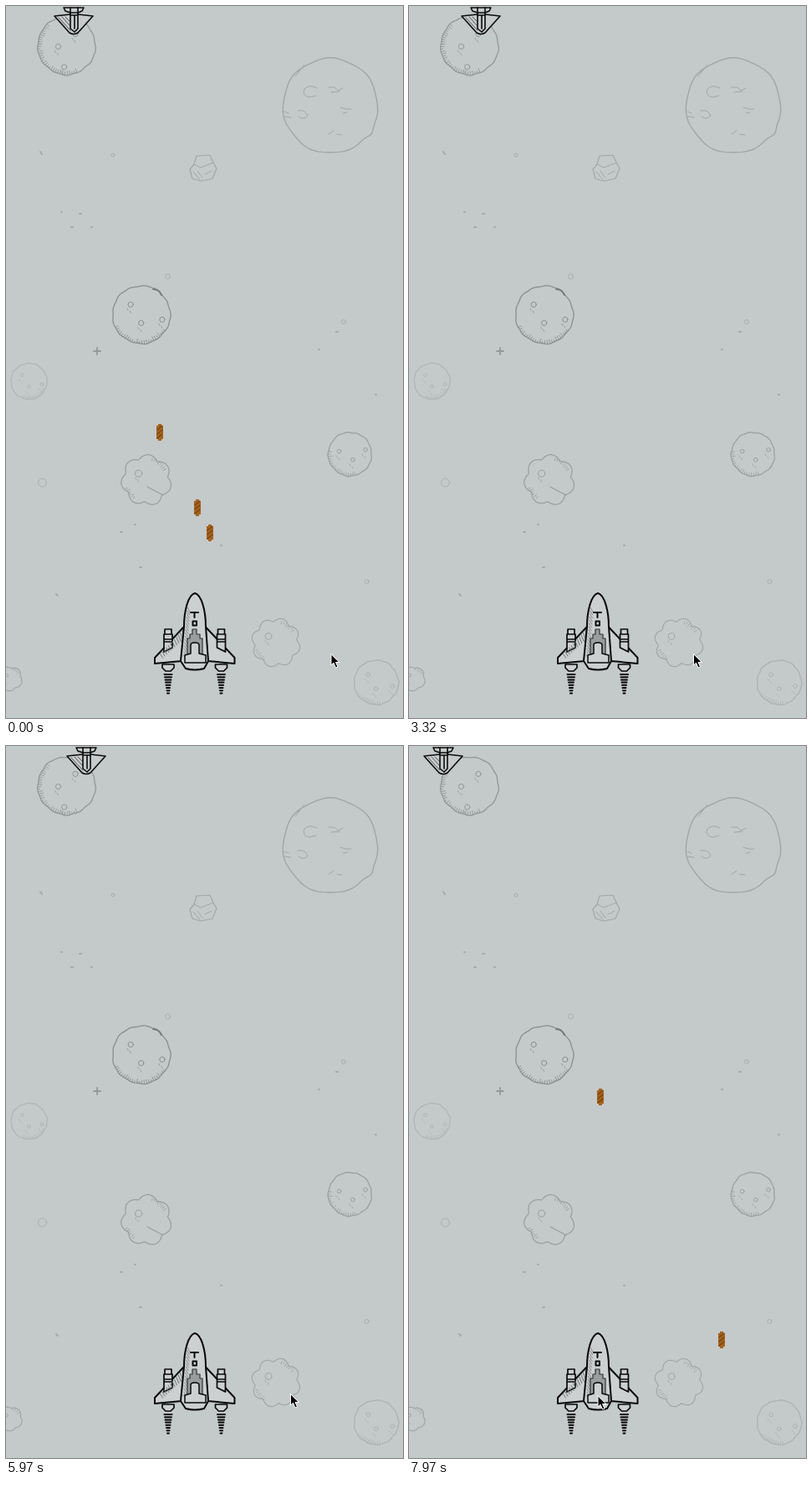
Write an HTML page that moves like this. It is 475 by 850 pixels and loops after 8 s.

```html
<!DOCTYPE html>
<html lang="en">
<head>
<meta charset="utf-8">
<title>Space sketch</title>
<style>
  html, body { margin: 0; width: 100%; height: 100%; overflow: hidden; background: #c4c9c9; }
  svg { display: block; width: 100%; height: 100%; }
  path, circle { stroke-linecap: round; stroke-linejoin: round; }
</style>
</head>
<body>
<svg viewBox="0 0 475 850">
  <defs>
    <path id="bullet" fill="#a5621e" d="M-2-10H2V-8H4V8H2V10H-2V8H-4V-8H-2Z"/>
    <path id="bulletMarks" stroke="#74420f" stroke-width="1.1" d="M-3-3L3-8M-3 2L3-3M-3 7L3 2"/>
  </defs>
  <g id="sky" fill="none"></g>

  <g fill="#ccd0d0" stroke="#080808" stroke-width="2">
    <g id="side">
      <path d="M213 741L178 778V785L210 782Z"/>
      <path stroke-width="1.7" d="M190 744H198V750H199V766L189 771V750H190ZM190 750H198M189 756H199M189 759H199"/>
      <path stroke-width="1.7" d="M187 786H201V790L197 794H191L187 790Z"/>
      <path id="flame"/>
    </g>
    <use href="#side" transform="translate(451.5) scale(-1 1)"/>
    <path id="wingShade" fill="none" stroke="#6f7373" stroke-width="1"/>
    <path d="M213 741C213 722 218 703 226 701C234 703 239 722 239 741L242 782L237 791Q226 794 215 791L209 782Z"/>
    <path id="bodyShade" fill="none" stroke="#858989" stroke-width="1"/>
    <path fill="none" d="M221 724H230M225.500 724V730M223.500 734.500H228V739.500H223.500Z"/>
    <path fill="#999d9d" stroke="#333" stroke-width="1.2" d="M223 744H228V750H232V755H235V775H217V755H220V750H223Z"/>
    <path stroke-width="1.5" d="M221 773V763Q221 760 226 760T231 763V773L239 775V784H214V775Z"/>
  </g>

  <g id="bullets"></g>

  <g id="enemy" fill="#c7cbcb" stroke="#0b0b0b" stroke-width="1.6">
    <path d="M-23 12L-4 10H5L23 12L5 32Q0 35-5 32Z"/>
    <path stroke="#555" stroke-width="1" d="M-18 14L-4 29M-14 13L-4 24M-10 13L-4 19"/>
    <path d="M-4 7H5V27L1 31L-4 27Z"/>
    <path d="M-12 2H12L10 6L5 8H-4L-10 6Z"/>
    <path fill="none" d="M-4 2V8M5 2V8M-4 11H5M1 12V27"/>
  </g>

  <path id="cursor" stroke="#fff" d="M0 0V13L3 10.200L5.500 16L8 15L5.500 9.500H9.500Z"/>
</svg>
<script>
const $ = id => document.getElementById(id);
const range = n => [...Array(n).keys()];

let seed = 7;
const random = () => (seed = seed * 16807 % 2147483647) / 2147483647;

/* ---------- background ---------- */
const sky = [];
const line = (d, color, width = 1) =>
  sky.push(`<path d="${d}" stroke="${color}" stroke-width="${width}"/>`);
const ring = (x, y, r, color) =>
  sky.push(`<circle cx="${x}" cy="${y}" r="${r}" stroke="${color}"/>`);
const polar = (x, y, r, a) => [x + r * Math.cos(a), y + r * Math.sin(a)];

// Closed outline whose radius is scaled by shape(angle)
function outline(x, y, r, color, width, shape) {
  const points = range(90).map(i => {
    const a = i / 45 * Math.PI;
    return polar(x, y, r * shape(a), a).map(v => v.toFixed(1));
  });
  line('M' + points.join('L') + 'Z', color, width);
}

// Short strokes pointing inwards along part of the rim
function rimHatch(x, y, r, from, to, color) {
  for (let a = from; a < to; a += 3 / r)
    line(`M${polar(x, y, r, a)}L${polar(x, y, r - 2 - random() * r * .1, a)}`, color, .9);
}

function crater(x, y, r, color) {
  ring(x, y, r, color);
  line(`M${x - 4} ${y + 5}l1 2m2 1l1 2`, color, .8);
}

function moon(x, y, r, color, turn, from, to) {
  const phase = random() * 6;
  outline(x, y, r, color, 1.3, a =>
    1 + .012 * Math.sin(5 * a + phase) + .012 * Math.sin(13 * a + 2 * phase));
  rimHatch(x, y, r, from, to, color);
  [[3.9, .51], [1.6, .29], [.23, .74]].forEach(([angle, distance]) =>
    crater(...polar(x, y, r * distance, angle + turn), r * .09, color));
}

// Scalloped asteroid
function asteroid(x, y, r, lumps, color) {
  outline(x, y, r, color, 1.2, a => .88 + .17 * Math.abs(Math.sin(a * lumps / 2 + .5)));
  rimHatch(x, y, r * .93, -1.3, -.5, color);
  rimHatch(x, y, r * .93, 2.2, 2.8, color);
  crater(x - r * .32, y - r * .27, r * .14, color);
}

const faint = '#a1a6a6';
moon(72.5, 47.5, 34.5, '#919697', 1.45, 1.2, 4);
moon(162, 368.5, 34.5, '#8a8e8f', 0, .6, 2.7);
line('M176 338Q183 338 186 345', '#777b7c', 2);
moon(27.5, 448, 21.5, '#b0b5b5', 0, .5, 2);
moon(411.5, 535, 26, '#9ba0a0', -.5, 1.3, 3.3);
moon(443, 807.5, 26.5, '#adb2b2', 0, 1.4, 2.6);
asteroid(168, 566, 29, 7, '#989d9d');
line('M169 574L188 584', '#989d9d', 1.2);
asteroid(323, 760, 28, 8, faint);
asteroid(5, 803, 14, 5, faint);

outline(388, 119, 56.5, faint, 1.4, a => 1 + .014 * Math.sin(7 * a) + .07 * Math.exp(-60 * (a - .6) ** 2));
line('M346 84l11-14m-8 9l6-6M372 98Q363 93 357 99Q354 107 363 109L371 107M349 125Q358 123 361 131Q357 137 350 132', faint);
line('M386 97l7 0 4 4 6-3m-14 5l10-1M400 121l7 2 6 0m-10 5l5-1M386 153l6-4m4 4l6 1M333 126l5 2m-5 4l8 1', faint);

line('M228 179L244 178L248 187L252 194L247 206L233 209L223 206L220 195L225 189Z', faint, 1.2);
line('M225 189L233 193L248 187M224 198l8 9m-3-10l6 8M238 201l8-4', faint);

[[128, 178, 2], [193.5, 323, 3], [404, 377, 2.5], [43.5, 569, 5], [431.5, 687, 2.5]]
  .forEach(([x, y, r]) => ring(x, y, r, '#a9aeae'));
line('M41 174l2 3M66 246h1M88 248h2M78 264h2M102 264h1M374 410h1M395 389h2M442 464h1M154 619h1M137 628h2M257 644h1M160 670h2M60 702l2 2', '#a4a9a9', 2);
line('M105 412h8M109 408v8', '#94999a', 1.8);
$('sky').innerHTML = sky.join('');

/* ---------- player details ---------- */
const strokes = (id, n, rule) => $(id).setAttribute('d', range(n).map(rule).join(''));
strokes('flame', 8, i => `M${189.5 + i * .5} ${798 + i * 3.2}h${9 - i}`);
strokes('wingShade', 12, i => `M${211 - i * 2.4} ${746 + i * 2.5}l3 ${8 - i * .3}`);
strokes('bodyShade', 16, i => `M${217 - i * .3} ${718 + i * 3.8}l3 5`);

/* ---------- motion ---------- */
const LOOP = 8000, STEP = 77.4, LEFT = 16, SPAN = 440, MUZZLE_Y = 49;

// [display step, distance flown]: about 30 px per step with one leap
const flight = [[0, 65], [17, 575], [18, 935], [68, 2450], [85, 2965], [104, 3525]];

// Distance flown at each firing
const shots = [-225, -210, -165, 315, 920, 960, 1085, 1710, 2120, 2200, 2275, 2820, 2845, 2865, 3165, 3310];

// [time, x, y]; the pointer is away between AWAY and BACK
const pointer = [[0, 389, 774], [780, 260, 595], [2080, 250, 767], [3320, 340.5, 774], [LOOP, 340.5, 774]];
const AWAY = 6000, BACK = 7200;

function along(rows, at) {
  const i = Math.max(1, rows.findIndex(row => row[0] > at));
  const [from, ...a] = rows[i - 1], [to, ...b] = rows[i];
  return a.map((v, n) => v + (b[n] - v) * (at - from) / (to - from));
}

// Bounces between both edges
function enemyX(distance) {
  const phase = (distance + 2 * SPAN) % (2 * SPAN);
  return LEFT + SPAN - Math.abs(SPAN - phase);
}

$('bullets').innerHTML = shots.map(() => '<g><use href="#bullet"/><use href="#bulletMarks"/></g>').join('');
const bullets = [...$('bullets').children];
const place = (node, x, y, visible = true) => {
  node.setAttribute('transform', `translate(${x} ${y})`);
  node.style.display = visible ? '' : 'none';
};

function draw(t) {
  const step = Math.floor((t + 25) / STEP);
  const distance = Math.floor(along(flight, step)[0] / 5 + 1e-6) * 5;
  place($('enemy'), enemyX(distance), 0);

  // Bullets fall twice as fast as the enemy flies
  shots.forEach((fired, i) => {
    const y = MUZZLE_Y + 2 * (distance - fired);
    place(bullets[i], enemyX(fired) + 3, y, y >= MUZZLE_Y && y < 865);
  });

  const [x, y] = t < BACK ? along(pointer, step * STEP) : [226, 776];
  place($('cursor'), x, y, t < AWAY || t >= BACK);
}

const start = performance.now();
function tick() {
  draw((performance.now() - start) % LOOP);
  requestAnimationFrame(tick);
}
tick();
</script>
</body>
</html>
```
